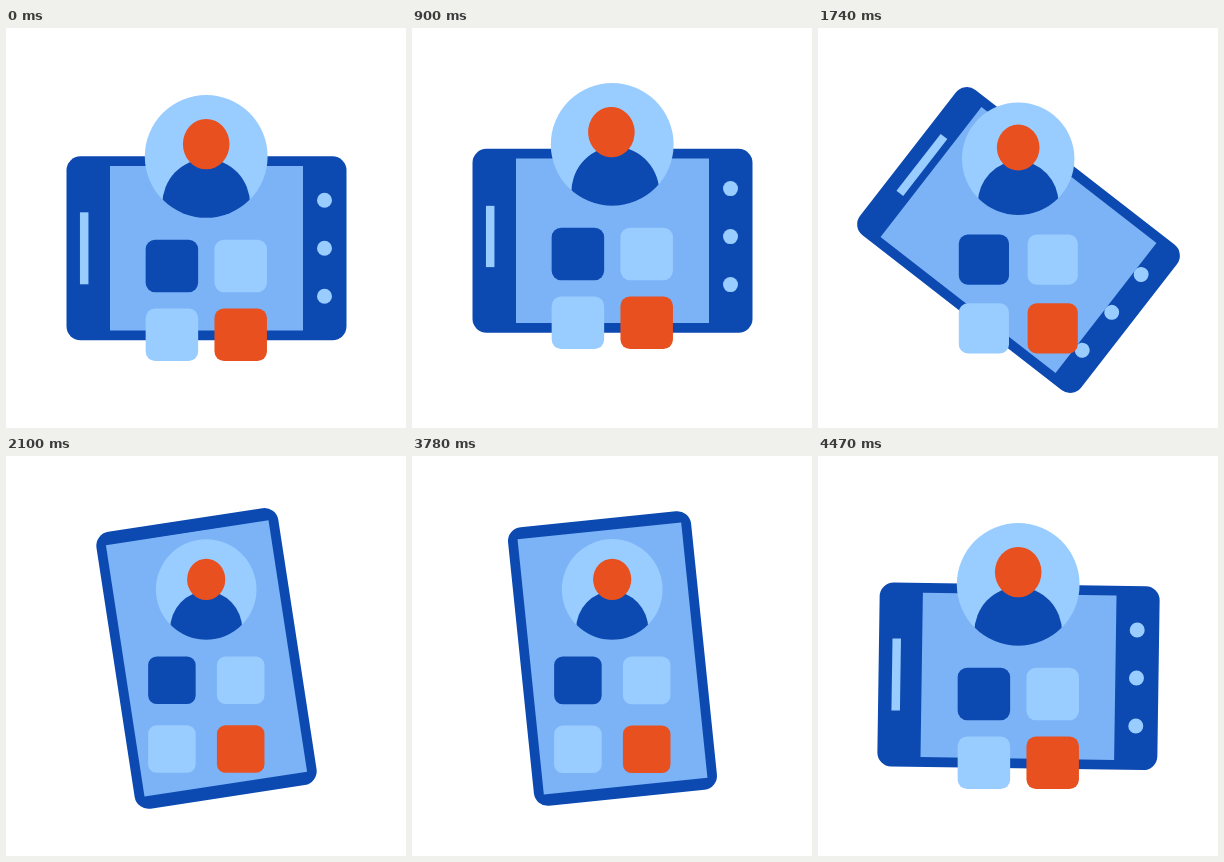
These frames come from a looping animation (400x400 px, 4.5 s). An HTML page with a canvas:

```html
<!DOCTYPE html>
<html lang="en">
<head>
<meta charset="utf-8">
<title>Rotating phone</title>
<style>
  html, body { margin: 0; width: 100%; height: 100%; overflow: hidden; background: #fff; }
  canvas { display: block; width: 100vmin; height: 100vmin; }
</style>
</head>
<body>
<canvas id="stage" width="400" height="400"></canvas>
<script>
const ctx = document.getElementById('stage').getContext('2d');
const LOOP = 4500;
const DARK = '#0c4ab2', SCREEN = '#7cb3f6', LIGHT = '#99ccff', ORANGE = '#e8501f';

const clamp = x => Math.min(1, Math.max(0, x));
const mix = (a, b, k) => a + (b - a) * k;
const smooth = x => (1 - Math.cos(Math.PI * clamp(x))) / 2;

// Quick start with a long, soft settling tail
function settle(ms, pace) {
  const k = Math.max(0, ms) / pace;
  return 1 - (1 + k + 0.3 * k * k) * Math.exp(-k);
}

// Dip down, swing up, then return to rest at the given time
function bounce(t, down, up, rest) {
  if (t < 510) return down * smooth(t / 510);
  if (t < 1020) return mix(down, up, smooth((t - 510) / 510));
  return up * (1 - smooth((t - 1020) / (rest - 1020)));
}

function box(cx, cy, w, h, r, color) {
  ctx.fillStyle = color;
  ctx.beginPath();
  ctx.roundRect(cx - w / 2, cy - h / 2, w, h, r);
  ctx.fill();
}

function oval(cx, cy, rx, ry, color) {
  ctx.fillStyle = color;
  ctx.beginPath();
  ctx.ellipse(cx, cy, rx, ry, 0, 0, Math.PI * 2);
  ctx.fill();
}

function drawPhone(t, turn, shift) {
  const lift = bounce(t, 10, -10, 1350);
  ctx.save();
  ctx.translate(200.5, mix(220.3, 200.5, shift) + lift);
  ctx.rotate(turn * Math.PI / 2);
  box(0, 0, 280, 184, 14, DARK);

  const slot = bounce(t, 16.5, -16, 1350);
  box(-122.3, slot - lift, 8.5, 72 - 15 * Math.abs(slot) / 16.5, 0, LIGHT);
  [1450, 1400, 1350].forEach((rest, i) => {
    oval(118, (i - 1) * 48 + bounce(t, 17.5, -16, rest) - lift, 7.5, 7.5, LIGHT);
  });

  box(0, 0, 280 - 2 * mix(43.5, 9.5, turn), 164.5, 0, SCREEN);
  ctx.restore();
}

function drawAvatar(t, shift) {
  const scale = mix(1, 0.8, shift);
  ctx.save();
  ctx.translate(200.2, mix(128.4, 134, shift) + bounce(t, 15, -16, 1350));
  ctx.scale(scale, scale);
  oval(0, 0, 61.4, 61.4, LIGHT);
  ctx.clip();
  ctx.rotate(bounce(t, 4.7, -5, 1375) * Math.PI / 180);
  oval(0, 48.5, 44, 46, DARK);
  oval(0, -12.3, 23.3, 25.2, ORANGE);
  ctx.restore();
}

function drawTiles(t, shift) {
  const pulse = smooth(1 - Math.abs(t - 3000) / 750);
  const rows = [
    { y: 238, rest: 1461, swell: 4.5, colors: [DARK, LIGHT] },
    { y: 306.8, rest: 1408, swell: -4.5, colors: [LIGHT, ORANGE] }
  ];
  for (const row of rows) {
    const size = mix(52.5, 47, shift) + row.swell * pulse;
    const y = row.y - 15.2 * shift + bounce(t, 14.9, -16, row.rest);
    row.colors.forEach((color, i) => {
      box(165.9 + i * 68.8, y, size, size, size * 0.18, color);
    });
  }
}

function draw(t) {
  const returning = t >= 3000;
  const turn = returning ? settle(LOOP - t, 131.6) : settle(t - 1502, 122);
  const shift = returning ? Math.pow(turn, 1.6) : turn;
  ctx.fillStyle = '#fff';
  ctx.fillRect(0, 0, 400, 400);
  drawPhone(t, turn, shift);
  drawAvatar(t, shift);
  drawTiles(t, shift);
}

const start = performance.now();
function frame() {
  draw((performance.now() - start) % LOOP);
  requestAnimationFrame(frame);
}
frame();
</script>
</body>
</html>
```
